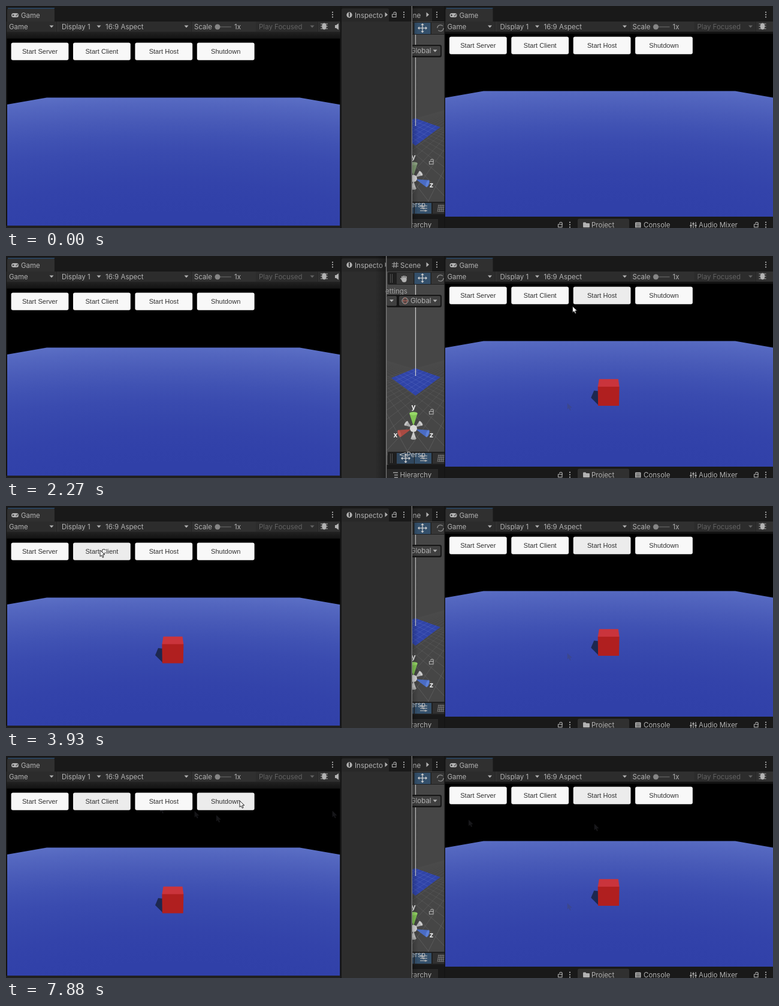
Recreate the animation shown at these times as an HTML page with a canvas. Size 1280 by 372 pixels, loop 8000 ms.

```html
<!DOCTYPE html>
<html lang="en">
<head>
<meta charset="utf-8">
<title>Two editor windows</title>
<style>
html, body { margin: 0; width: 100%; height: 100%; overflow: hidden; background: #191919; }
canvas { display: block; width: 1280px; height: 372px; }
</style>
</head>
<body>
<canvas id="stage" width="1280" height="372"></canvas>
<script>
const c = document.getElementById('stage').getContext('2d');
const LOOP = 8000;
const UI = '11.5px Inter, "Open Sans", sans-serif';
const BOLD = 'bold 12px Inter, "Open Sans", sans-serif';
const INK = '#b2b2b2', DIM = '#626262', BAR = '#303030', BACK = '#191919';

const RIGHT_CLICK = 1060, LEFT_CLICK = 3450;
const RIGHT_FRONT = RIGHT_CLICK + 140, LEFT_FRONT = LEFT_CLICK + 140;
const RIGHT_CUBE = RIGHT_CLICK + 470, LEFT_CUBE = LEFT_CLICK + 480;

// Pointer moves, each from the end of the one before; bow bends it downwards.
const START = { x: 872, y: 338 };
const MOVES = [
  { from: 30, to: 430, x: 1000, y: 66, bow: 46 },
  { from: 2237, to: 3060, x: 159, y: 74, bow: 46 },
  { from: 3100, to: 3310, x: 157, y: 74, bow: 0 },
  { from: 5130, to: 5400, x: 351, y: 99, bow: -3 },
  { from: 5400, to: 5830, x: 418, y: 201, bow: 0 },
  { from: 5990, to: 6530, x: 392, y: 75, bow: 0 },
  { from: 6970, to: 7370, x: 1068, y: 112, bow: 11 },
  { from: 7370, to: 7770, x: 392, y: 76, bow: 11 },
  { from: 7780, to: 7880, x: 390, y: 75, bow: 0 }
];
// Moments at which the pointer leaves a faint mark behind.
const MARKS = [165, 5223, 5293, 5399, 7028, 7122, 7240];

const ramp = (t, a, b) => Math.min(1, Math.max(0, (t - a) / (b - a)));
const mix = (a, b, k) => a + (b - a) * k;

function pointerAt(t) {
  let { x, y } = START;
  for (const m of MOVES) {
    if (t < m.from) break;
    const u = Math.sin(ramp(t, m.from, m.to) * Math.PI / 2);
    x = mix(x, m.x, u);
    y = mix(y, m.y, u) + m.bow * Math.max(0, Math.sin(Math.PI * u)) ** .6;
  }
  return [x, y];
}

function rect(x, y, w, h, fill, r = 0) {
  c.fillStyle = fill;
  c.beginPath();
  c.roundRect(x, y, w, h, r);
  c.fill();
}

function trace(points) {
  c.beginPath();
  points.forEach(([x, y]) => c.lineTo(x, y));
  c.closePath();
}

function poly(points, fill) {
  trace(points);
  c.fillStyle = fill;
  c.fill();
}

function oval(x, y, rx, ry, fill) {
  c.beginPath();
  c.ellipse(x, y, rx, ry, 0, 0, 7);
  c.fillStyle = fill;
  c.fill();
}

const dot = (x, y, r, fill) => oval(x, y, r, r, fill);

function ring(x, y, rx, ry, color, w = 1) {
  c.beginPath();
  c.ellipse(x, y, rx, ry, 0, 0, 7);
  c.strokeStyle = color;
  c.lineWidth = w;
  c.stroke();
}

function line(x1, y1, x2, y2, color = INK, w = 1) {
  c.beginPath();
  c.moveTo(x1, y1);
  c.lineTo(x2, y2);
  c.strokeStyle = color;
  c.lineWidth = w;
  c.stroke();
}

function text(s, x, y, color = INK, font = UI, align = 'left') {
  c.font = font;
  c.fillStyle = color;
  c.textAlign = align;
  c.fillText(s, x, y);
}

function fade(x1, y1, x2, y2, from, to) {
  const g = c.createLinearGradient(x1, y1, x2, y2);
  g.addColorStop(0, from);
  g.addColorStop(1, to);
  return g;
}

function inside(x, y, w, h, draw) {
  c.save();
  c.beginPath();
  c.rect(x, y, w, h);
  c.clip();
  draw();
  c.restore();
}

function moved(dx, dy, turn, draw) {
  c.save();
  c.translate(dx, dy);
  c.rotate(turn);
  draw();
  c.restore();
}

function times(n, draw) {
  for (let i = 0; i < n; i++) draw(i);
}

// Small interface icons
const down = (x, y, color = INK) => poly([[x - 3.5, y - 2], [x + 3.5, y - 2], [x, y + 2]], color);
const next = (x, y) => poly([[x - 2, y - 4], [x + 2.5, y], [x - 2, y + 4]], INK);
const kebab = (x, y) => times(3, i => dot(x, y - 4 + i * 4, 1.1, '#c0c0c0'));

function lock(x, y) {
  c.strokeStyle = INK;
  c.lineWidth = 1.1;
  c.strokeRect(x - 3.5, y - .5, 6.5, 4.5);
  c.beginPath();
  c.arc(x + 1, y - 2, 2.2, Math.PI, 0);
  c.lineTo(x + 3.2, y);
  c.stroke();
}

function gamepad(x, y) {
  rect(x - 6, y - 3.5, 12, 7, INK, 3.5);
  line(x - 4.5, y, x - 1.5, y, BAR);
  line(x - 3, y - 1.5, x - 3, y + 1.5, BAR);
  dot(x + 2.3, y + .8, .9, BAR);
  dot(x + 4, y - .8, .9, BAR);
}

function bug(x, y) {
  times(3, i => line(x - 6, y - 4 + i * 4, x + 6, y - 4 + i * 4));
  oval(x, y, 3.8, 5.5, INK);
}

function hand(x, y) {
  oval(x + .5, y + 3, 4, 4, INK);
  times(4, i => line(x - 2.7 + i * 2.1, y + 3, x - 3.2 + i * 2.4, y - 4.5 + Math.abs(i - 1.5), INK, 1.6));
  line(x - 2, y + 4, x - 5.5, y, INK, 1.8);
}

function fourWay(x, y) {
  times(4, i => moved(x, y, i * Math.PI / 2, () => {
    line(0, 0, 6, 0, '#d0d0d0', 1.3);
    poly([[5, -2.7], [8, 0], [5, 2.7]], '#d0d0d0');
  }));
}

function arrow(x, y, fill, edge) {
  trace([[0, 0], [0, 10.6], [2.5, 8.5], [4.3, 12.4], [6, 11.6], [4.4, 7.8], [7.8, 7.6]].map(([a, b]) => [x + a, y + b]));
  c.fillStyle = fill;
  c.fill();
  if (!edge) return;
  c.strokeStyle = edge;
  c.lineWidth = 1;
  c.stroke();
}

// Game view parts, shared by both windows
function dropdown(label, x, w, color = INK) {
  rect(x, 26, w, 17, '#2c2c2c');
  text(label, x + 5, 38.5, color);
  down(x + w - 7, 34.5, color);
  line(x + w + 1.5, 26, x + w + 1.5, 43, '#222');
}

function gameBar() {
  rect(2, 4, 79, 23, BAR, [3, 3, 0, 0]);
  rect(3, 3, 78, 1.5, '#28496b');
  gamepad(15, 15.5);
  text('Game', 25, 19.5);
  rect(0, 26, 558, 17.5, BAR);
  dropdown('Game', 0, 83);
  dropdown('Display 1', 88, 74);
  dropdown('16:9 Aspect', 161, 147);
  text('Scale', 314, 38.5);
  line(350, 35, 376, 35, '#5a5a5a', 1.5);
  dot(353, 35, 4.5, '#858585');
  text('1x', 381, 38.5);
  dropdown('Play Focused', 417, 101, DIM);
  bug(531, 34);
  rect(549, 32, 3, 5, INK);
  poly([[551, 32], [555, 29], [555, 40], [551, 37]], INK);
}

// Floor from x1 to x2 whose far edge runs level between a and b.
function floor(x1, x2, a, b, top, bottom) {
  const slope = .174;
  c.save();
  trace([[x1, top + (a - x1) * slope], [a, top], [b, top], [x2, top + (x2 - b) * slope], [x2, bottom], [x1, bottom]]);
  c.clip();
  c.translate((a + b) / 2, bottom + 32);
  c.scale(900, 250);
  const g = c.createRadialGradient(0, 0, 0, 0, 0, 1.05);
  times(11, i => {
    const v = (i / 10) ** 3;
    g.addColorStop(i / 10, `rgb(${48 + 48 * v},${64 + 52 * v},${168 + 32 * v})`);
  });
  c.fillStyle = g;
  c.fillRect(-1, -1.2, 2, 1.4);
  c.restore();
}

function cube() {
  poly([[254, 238], [262, 239], [262, 263], [249, 250]], '#1d2850');
  poly([[260.4, 231], [296.3, 231], [295.7, 263.4], [260.8, 263.4]], '#b01f1f');
  poly([[262.5, 218.7], [294.5, 218.7], [296.3, 231.5], [260.4, 231.5]], '#ca343c');
}

const buttonX = i => 8.6 + i * 103.4;

// Shade of a button, from how long the pointer was over it lately.
function hover(t, i) {
  let n = 0;
  times(5, k => {
    const [x, y] = pointerAt(t - k * 20);
    if (x > buttonX(i) && x < buttonX(i) + 96 && y > 62 && y < 91) n++;
  });
  return t < LEFT_FRONT ? 0 : n / 5;
}

function buttons(shade) {
  ['Start Server', 'Start Client', 'Start Host', 'Shutdown'].forEach((label, i) => {
    const v = 248 - 12 * shade(i);
    rect(buttonX(i), 61.6, 95.8, 29.2, `rgb(${v},${v},${v})`, 3);
    text(label, buttonX(i) + 47.9, 80, '#323232', '11.1px "Liberation Sans", Arial, sans-serif', 'center');
  });
}

function marks(t) {
  MARKS.forEach(time => {
    if (t > time) arrow(...pointerAt(time), 'rgba(70,70,80,.32)');
  });
}

function leftWindow(t) {
  rect(0, 0, 678, 372, BACK);
  inside(1.5, 0, 556, 368, () => {
    gameBar();
    kebab(545, 14.5);
    rect(0, 43.5, 558, 11, fade(0, 43, 0, 55, '#222', '#121212'));
    rect(0, 54.5, 558, 314, '#000');
    floor(2, 557.5, 68, 490, 153.5, 368);
    if (t >= LEFT_CUBE) cube();
    marks(t);
    const chosen = ramp(t, LEFT_FRONT, LEFT_FRONT + 100);
    buttons(i => i === 1 ? chosen : hover(t, i));
  });
  rect(0, 368, 558, 4, '#202020');

  rect(558, 0, 2, 372, '#151515');
  rect(560, 4, 79, 23, '#282828', [3, 3, 0, 0]);
  rect(560, 26, 117, 346, '#2d2d2d');
  dot(573, 15, 4.7, INK);
  text('i', 573, 18, '#282828', BOLD, 'center');
  text('Inspecto', 582, 19.5);
  next(634.5, 14.5);
  lock(648, 14.5);
  kebab(664, 14.5);
}

// Gizmo cone whose tip sits at the hub.
function cone(angle, length, half, side, base) {
  moved(680, 289, angle * Math.PI / 180, () => {
    poly([[4, 0], [length, -half], [length, half]], side);
    oval(length, 0, half * .4, half, base);
  });
}

function gizmo(awake) {
  cone(215, 15, 4.5, '#a8a8a8', '#c4c4c4');
  cone(325, 15, 4.5, '#b0b0b0', '#cccccc');
  cone(-90, 25, 6.7, awake ? '#82c455' : '#7f9a73', awake ? '#98d968' : '#93a988');
  cone(160, 25, 6.2, '#a94a42', '#bb5a50');
  cone(20, 25, 6.2, '#4a6cc4', '#5c80d8');
  dot(680, 289, 6, '#d8d8d8');
  cone(90, 17, 4.5, '#c8c8c8', '#b4b4b4');
  text('y', 680, 257, '#eee', BOLD, 'center');
  text('x', 650, 304, '#eee', BOLD, 'center');
  text('z', 710, 304, '#eee', BOLD, 'center');
  lock(710, 261);
}

function ground() {
  const haze = fade(0, 163, 0, 340, 'rgba(160,160,160,.05)', 'rgba(150,150,150,.35)');
  times(28, i => {
    line(790, 158, 100 + i * 42, 360, haze, .8);
    line(577, 158, 100 + i * 42, 360, haze, .8);
  });
  const [west, north, east, south] = [[643, 204.5], [683, 188], [725, 203], [683.5, 234]];
  poly([west, north, east, south], '#3044a8');
  const at = (p, q, k) => [mix(p[0], q[0], k), mix(p[1], q[1], k)];
  times(5, i => {
    const k = (i + 1) / 6;
    line(...at(west, north, k), ...at(south, east, k), 'rgba(150,165,230,.25)', .7);
    line(...at(west, south, k), ...at(north, east, k), 'rgba(150,165,230,.25)', .7);
  });
}

function strip(y, h) {
  rect(637, y, 96, h, '#1f1f1f', 2);
  times(2, i => line(641.5 + i * 3, y + 3, 641.5 + i * 3, y + h - 3, '#555'));
}

function sceneView(awake) {
  rect(635, 26, 98, 327, '#464646');
  inside(635, 163, 98, 190, ground);
  line(683.5, 48, 683.5, 201, '#d0d0d0', 1.2);
  gizmo(awake);

  strip(27, 21);
  rect(652, 28, 28, 19, '#363636');
  rect(681.5, 28, 27, 19, '#34506b');
  rect(710, 28, 23, 19, '#363636');
  hand(664, 37);
  fourWay(695, 37);
  c.setLineDash([12, 4]);
  ring(725, 37, 5.2, 5.2, '#909090', 1.3);
  c.setLineDash([]);

  text('ettings', 633, 63, '#a0a0a0');
  rect(635, 65, 92, 21, '#161616', 3);
  rect(635, 67, 17, 16.5, '#404040', 2);
  down(643.5, 75);
  rect(656, 67, 69, 16.5, '#404040', 2);
  ring(666, 75, 5, 5, INK);
  ring(666, 75, 2.2, 5, '#b0645a');
  line(661, 75, 671, 75, '#b0645a');
  text('Global', 675, 79);
  down(716, 75.2);

  strip(328, 22);
  rect(652, 330, 29, 18, '#30475e');
  rect(682, 330, 28, 18, '#34506b');
  rect(712, 330, 21, 18, BAR);
  fourWay(667, 339);
  times(3, i => {
    line(691, 335 + i * 4, 703, 335 + i * 4, INK, 1.2);
    dot(694 + i * 3, 335 + i * 4, 1.6, INK);
  });
  times(4, i => {
    line(722 + i * 3, 333, 720 + i * 3, 345, '#8a8a8a', .8);
    line(721, 334 + i * 3.3, 733, 334 + i * 3.3, '#8a8a8a', .8);
  });
  times(2, i => line(657, 333, 667, 329.5 + i * 7, '#c4c4c4'));
  text('Persp', 668.5, 337, '#c4c4c4');
}

function bottomTabs() {
  rect(733, 353, 547, 19, BACK);
  lock(925, 366.5);
  kebab(941, 366.5);
  rect(954, 356.5, 86, 16, BAR, [3, 3, 0, 0]);
  rect(963, 362.5, 5, 3, INK, 1);
  rect(963, 364, 11, 7, INK, 1);
  text('Project', 977, 371);
  rect(1050, 362.5, 9.5, 9, INK, 1);
  times(3, i => line(1051.5, 365 + i * 2.5, 1058, 365 + i * 2.5, '#222', .9));
  text('Console', 1064, 371);
  times(3, i => {
    const x = 1143 + i * 4, y = 368 - i % 2 * 3;
    line(x, 362, x, 372, INK, 1.1);
    line(x - 1.7, y, x + 1.7, y, INK, 1.8);
  });
  text('Audio Mixer', 1156, 371);
  lock(1252, 366.5);
  kebab(1268, 366.5);
}

function rightWindow(t) {
  rect(635, 0, 645, 372, BACK);
  rect(635, 4, 76, 23, '#282828');
  times(2, i => {
    line(648 + i * 4, 10, 647 + i * 4, 20);
    line(644, 13 + i * 4, 655, 13 + i * 4);
  });
  text('Scene', 658, 19.5);
  next(703.5, 14.5);
  kebab(719, 14.5);
  sceneView(t >= RIGHT_FRONT);
  rect(635, 350, 98, 22, BACK);
  rect(636, 357, 85, 15, '#282828');
  times(3, i => line(i ? 648 : 646, 363 + i * 4, 654, 363 + i * 4, INK, 1.3));
  text('Hierarchy', 657.5, 371);
  rect(731.5, 0, 2, 372, '#141414');

  inside(733, 0, 547, 372, () => {
    moved(731.5, 0, 0, gameBar);
    kebab(1268, 14.5);
    rect(733, 43.5, 547, 310, '#000');
    rect(733, 43.5, 547, 3, '#131313');
    floor(733, 1280, 797, 1217, 142.5, 353);
    if (t >= RIGHT_CUBE) moved(727.3, -12.5, 0, cube);
    marks(t);
    const chosen = ramp(t, RIGHT_FRONT, RIGHT_FRONT + 100);
    moved(731.3, -10, 0, () => buttons(i => i === 2 ? chosen : 0));
    bottomTabs();
  });
}

function pointer(t) {
  if (t < START_TIME) return;
  const age = t - (t < LEFT_CLICK ? RIGHT_CLICK : LEFT_CLICK);
  const [x, y] = pointerAt(t);
  if (age >= 0 && age < 250) {
    c.globalAlpha = .8 * (1 - ramp(age, 130, 250));
    dot(x + .3, y, 8.7, '#f2e320');
    c.globalAlpha = 1;
  }
  // The first press briefly shows a busy sign in place of the arrow.
  if (t >= RIGHT_CLICK && t < RIGHT_CLICK + 60) {
    ring(x + .5, y - .5, 4.8, 4.8, '#7cb83c', 2.2);
    line(x - 2.5, y, x + 3.5, y, '#5c9a58', 1.6);
  } else {
    arrow(x, y, '#fff', '#222');
  }
}

const START_TIME = MOVES[0].from;

function draw(t) {
  if (t >= RIGHT_FRONT && t < LEFT_FRONT) {
    leftWindow(t);
    rect(616, 0, 18, 372, fade(616, 0, 634, 0, 'rgba(0,0,0,0)', 'rgba(0,0,0,.3)'));
    rightWindow(t);
    rect(634, 0, 1.3, 372, '#7c7c7c');
  } else {
    rightWindow(t);
    rect(678, 0, 10, 372, fade(678, 0, 688, 0, 'rgba(0,0,0,.2)', 'rgba(0,0,0,0)'));
    leftWindow(t);
    rect(676.7, 0, 1.3, 372, '#7c7c7c');
  }
  pointer(t);
}

const begin = performance.now();
function tick() {
  draw((performance.now() - begin) % LOOP);
  requestAnimationFrame(tick);
}
tick();
</script>
</body>
</html>
```
